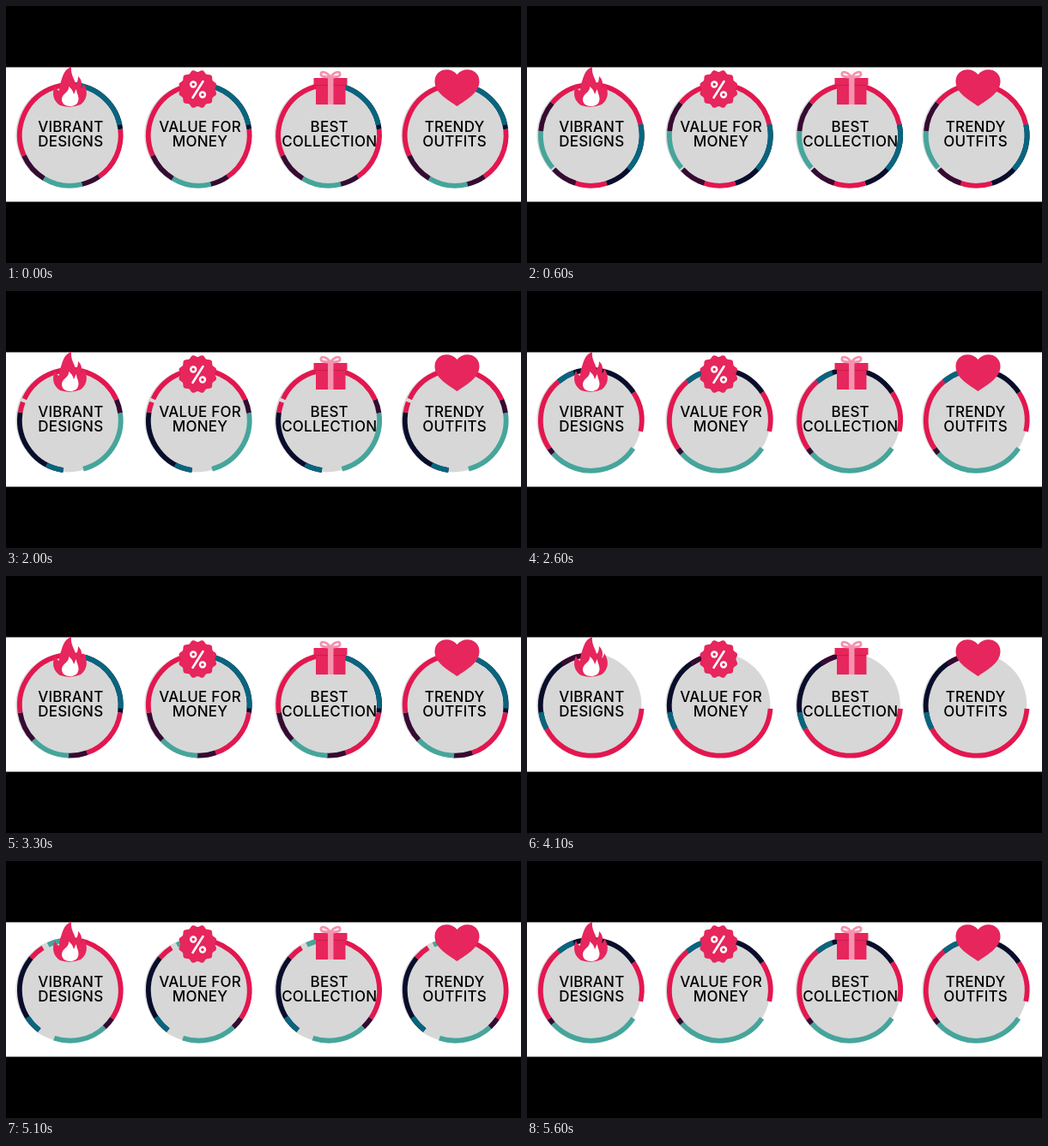
Animation of 600x300 px, one loop 5.7 s. Source, as an HTML page with a canvas:

```html
<!DOCTYPE html>
<html lang="en">
<head>
<meta charset="utf-8">
<style>
  html, body { margin: 0; width: 100%; height: 100%; overflow: hidden; background: #000; }
  canvas { display: block; }
</style>
</head>
<body>
<canvas id="stage" width="600" height="300"></canvas>
<script>
const ctx = document.getElementById('stage').getContext('2d');
const PINK = '#e6265c', ROSE = '#f592b0';
const colors = { teal: '#46a59b', plum: '#350b32', pink: '#e3174f', navy: '#090d2b', blue: '#08657f' };
const LOOP = 5700, SPIN = 3000, STEP = 100;
const ENTRY = 360, EXIT = 1080; // both at the top of the ring

const badges = [
  { x: 74.8, textX: 75.3, lines: ['VIBRANT', 'DESIGNS'], icon: flame },
  { x: 224.8, textX: 226, lines: ['VALUE FOR', 'MONEY'], icon: percent },
  { x: 376.2, textX: 376.7, lines: ['BEST', 'COLLECTION'], icon: gift },
  { x: 523.7, textX: 522.6, lines: ['TRENDY', 'OUTFITS'], icon: heart }
];

const ramp = (t, from, to) => Math.min(1, Math.max(0, (t - from) / (to - from)));
const mix = (a, b, k) => a + (b - a) * k;

// One wave of colour turns clockwise, slows to a rest, then speeds up and leaves at the top.
function waveArcs(t) {
  const arcs = [];
  const u = (t - 3050) / 1050;
  const turn = 207 * Math.sign(u) * Math.abs(u) ** 1.85;
  const grow = ramp(t, 1700, 2000), swap = ramp(t, 2000, 2600);
  const settle = ramp(t, 2600, 3000), leave = ramp(t, 3300, 4100);
  const open = swap - leave, bloom = settle - leave;

  function add(color, from, to, min = ENTRY) {
    const tail = Math.max(from + turn, min), head = Math.min(to + turn, EXIT);
    if (head - tail > 0.1) arcs.push([colors[color], tail, head]);
  }

  // Leading half
  const seam = 755 - 32 * open;
  const navyEnd = 846 - 26 * open - 16 * bloom;
  const pinkEnd = 858 + 8 * open;
  add('navy', seam, navyEnd);
  add('blue', seam, seam + 20 + 56 * bloom);
  add('plum', seam - 90 * (1 - grow), seam + 20 * (1 - grow));
  add('pink', navyEnd, pinkEnd);
  add('plum', pinkEnd - 20 * leave, pinkEnd + 22 * settle);

  // Trailing half: teal and plum push in from the tail and squeeze the old head away
  const start = 502 + 25 * swap;
  const lap = t > 3100 ? 360 : 0;
  const tealEnd = start + (105 - 60 * settle) * swap;
  const plumEnd = start + (112 - 32 * settle) * swap;
  const oldPink = mix(start + 131, seam, swap);
  const oldPlum = mix(start + 147, seam, swap);
  const oldTeal = mix(seam - 23, seam, swap);
  const trail = (color, from, to, shift = 0) => add(color,
    mix(seam, from, grow) + shift, mix(seam, to, grow) + shift, 0);
  trail('teal', start, tealEnd, lap);
  trail('plum', tealEnd, plumEnd, lap);
  trail('pink', plumEnd, oldPink);
  trail('plum', oldPink, oldPlum);
  trail('teal', oldPlum, oldTeal);
  return arcs;
}

function fill(color, path) {
  ctx.fillStyle = color;
  ctx.fill(new Path2D(path));
}

function stroke(color, width, path) {
  ctx.strokeStyle = color;
  ctx.lineWidth = width;
  ctx.stroke(new Path2D(path));
}

function disc(color, x, y, r) {
  ctx.fillStyle = color;
  ctx.beginPath();
  ctx.arc(x, y, r, 0, 7);
  ctx.fill();
}

function flame() {
  fill(PINK, 'M76 71C66 75 66 84 63 91Q62 95 62 99C59 98 58 96 57 93C53 102 55 111 63 116Q75 120 87 115C95 109 96 99 90 90Q90 94 87 96C89 90 88 86 84 82Q84 89 81 91C80 85 75 80 76 71Z');
  fill('#fff', 'M73 94C74 101 65 102 65 109C65 114 69 117 75 117C82 117 86 112 84 105C83 101 82 100 82 97C80 99 80 102 79 103C78 99 76 96 73 94Z');
}

function percent() {
  let rim = '';
  for (let i = 0; i < 120; i++) {
    const a = i * Math.PI / 60, r = 21.3 - 1.2 * Math.cos(a * 12);
    rim += (i ? 'L' : 'M') + (223.3 + r * Math.cos(a)) + ' ' + (97 + r * Math.sin(a));
  }
  fill(PINK, rim + 'Z');
  ctx.lineCap = 'round';
  stroke('#fff', 2.6, 'M229.5 88L217.5 107');
  ctx.lineCap = 'butt';
  for (const [x, y] of [[218.2, 91.5], [229, 103.5]]) {
    disc('#fff', x, y, 4.2);
    disc(PINK, x, y, 1.7);
  }
}

function gift() {
  fill(PINK, 'M358.5 84H397.5V92H395.5V115H361V92H358.5Z');
  fill('#c91c4c', 'M361 92H395.5V93H361Z');
  fill(ROSE, 'M375 84H381.5V115H375Z');
  stroke(ROSE, 2.8, 'M378 83C373 76 367 76 367 79C366 82 370 83 378 83C386 83 390 82 389 79C389 76 383 76 378 83');
}

function heart() {
  fill(PINK, 'M525.5 117C516 110 499.5 102 499.5 88C499.5 73 518 70 525.5 80C533 70 551.5 73 551.5 88C551.5 102 535 110 525.5 117Z');
}

function drawBadge({ x, textX, lines, icon }, arcs) {
  disc('#d7d7d7', x - 2.4, 150.5, 61);
  ctx.lineWidth = 5.8;
  for (const [color, from, to] of arcs) {
    ctx.strokeStyle = color;
    ctx.beginPath();
    ctx.arc(x, 150.8, 58.9, (from - 90) * Math.PI / 180, (to - 90) * Math.PI / 180);
    ctx.stroke();
  }
  ctx.fillStyle = '#000';
  lines.forEach((line, i) => ctx.fillText(line, textX, 147.3 + i * 17));
  icon();
}

function frame(now) {
  const t = Math.floor(now % LOOP / STEP) * STEP % SPIN;
  const arcs = [...waveArcs(t + SPIN), ...(t > 1100 ? waveArcs(t) : [])];
  ctx.fillStyle = '#000';
  ctx.fillRect(0, 0, 600, 300);
  ctx.fillStyle = '#fff';
  ctx.fillRect(0, 71.5, 600, 157);
  ctx.font = '500 17px Inter, sans-serif';
  ctx.letterSpacing = '0.2px';
  ctx.textAlign = 'center';
  for (const badge of badges) drawBadge(badge, arcs);
}

const start = performance.now();
(function tick() {
  frame(performance.now() - start);
  requestAnimationFrame(tick);
})();
</script>
</body>
</html>
```
